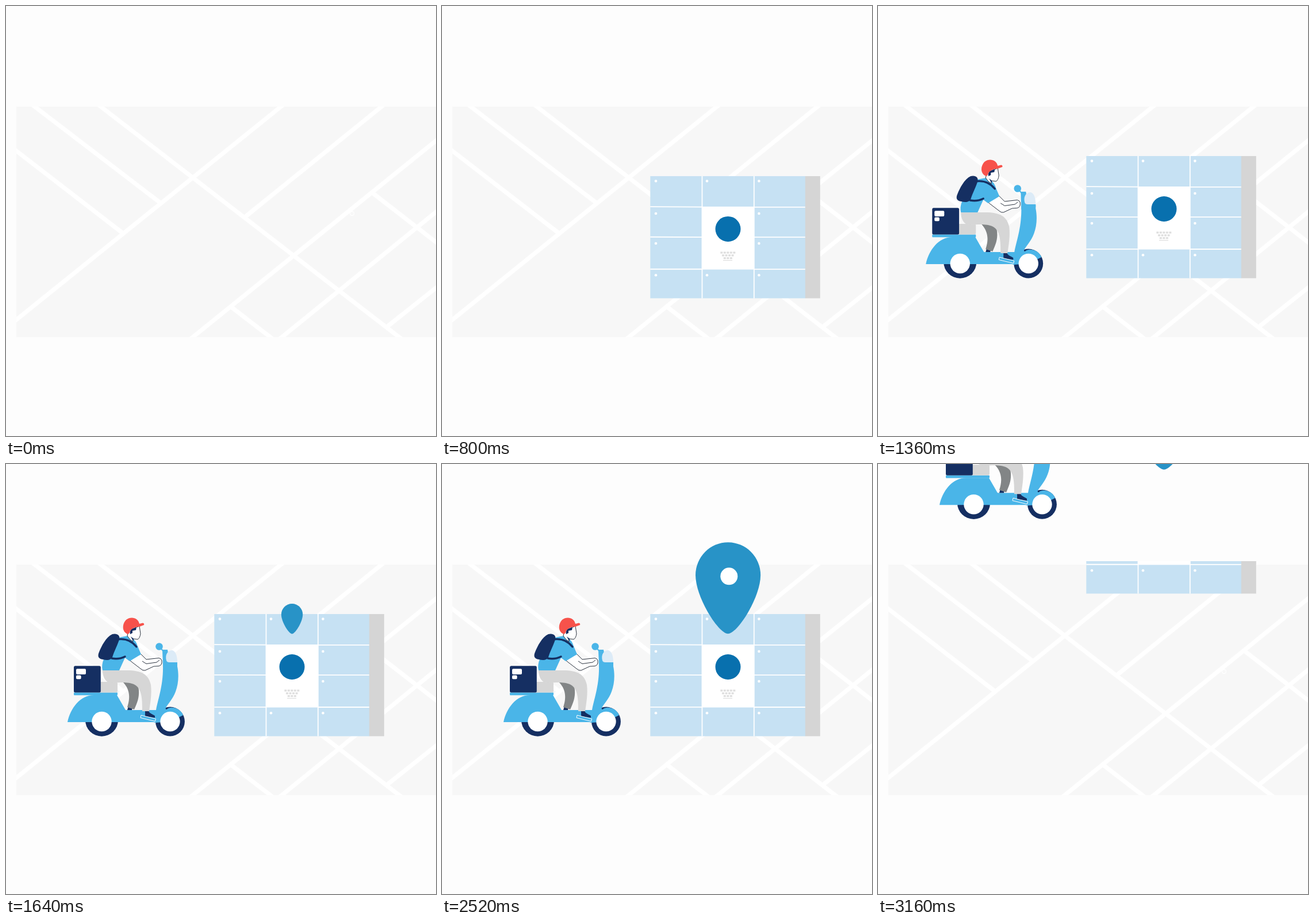
Animation of 748 by 748 pixels, one loop 3.2 s. Source, as an HTML page:

```html
<!DOCTYPE html>
<html lang="en">
<head>
<meta charset="utf-8">
<title>Parcel locker delivery</title>
<style>
  html, body { margin: 0; width: 100%; height: 100%; overflow: hidden; background: #fdfdfd; }
  svg { display: block; width: 100%; height: 100%; }
  .blue { fill: #4ab5e8; }
  .navy { fill: #152f62; }
  .grey { fill: #d6d6d6; }
  .white { fill: #fff; }
  .line { fill: none; stroke: #152f62; stroke-width: 3.4; stroke-linecap: round; }
  .ink { fill: #fff; stroke: #2c3440; stroke-width: 1; stroke-linejoin: round; }
</style>
</head>
<body>
<svg viewBox="0 0 748 748">
  <defs>
    <clipPath id="mapClip"><rect x="18" y="175" width="730" height="401"/></clipPath>
    <clipPath id="lockerClip"><rect x="340" y="169" width="340" height="406"/></clipPath>
  </defs>

  <g clip-path="url(#mapClip)">
    <rect x="18" y="175" width="730" height="401" fill="#f7f7f7"/>
    <path fill="none" stroke="#fff" stroke-width="7.4" d="M46 172L268 342M161 172L689 580M14 249L203 395M14 549L482 172
      M417 366L657 172M320 580L752 231M391 523L465 580M636 324L752 414M475 580L752 355M664 557L752 487"/>
    <circle cx="602" cy="361" r="3.5" fill="none" stroke="#fff" stroke-width="1.3"/>
  </g>

  <g clip-path="url(#lockerClip)">
    <g id="locker">
      <rect x="362.3" y="261" width="270" height="212.5" fill="#c6e1f3"/>
      <rect x="631.8" y="261" width="26" height="212.5" fill="#d5d5d5"/>
      <rect class="white" x="452.3" y="314" width="90.7" height="109.5"/>
      <path fill="none" stroke="#fff" stroke-width="1.8" d="M452.5 261V473.5M542.8 261V473.5
        M362.3 314.2L452 314.6M362.3 366.8L452 367.2M362.3 422.8H452M543 314.9H631.8M543 367.2H631.8M543 423H631.8"/>
      <g id="knobs" class="white"></g>
      <circle cx="497.5" cy="353" r="22" fill="#0870ae"/>
      <g id="keys" fill="#dedede"></g>
      <rect x="489" y="407" width="16" height="1.2" fill="#dedede"/>
    </g>
  </g>

  <g id="scooter">
    <!-- wheels and body -->
    <path class="navy" d="M138 446A28.3 27.5 0 0 0 195 446Z"/>
    <circle class="navy" cx="285.5" cy="448" r="25.4"/>
    <path class="blue" d="M107 449C112 425 129 402 153 402H193L208 428H261C264 410 274 385 273 350L272 324H279
      L298 346V352C301 367 300 383 295 396C290 409 282 417 278 424C277 427 279 428 282 425C293 421 305 428 308 437
      L285.5 448L260 450L257 449Z"/>
    <circle class="white" cx="166.5" cy="448" r="17.2"/>
    <circle class="white" cx="285.5" cy="448" r="17.2"/>
    <path class="blue" d="M273 323H281L285 345H298V350Q297 354 292 354H273Z"/>
    <path fill="#dcebf7" d="M279 342C276 331 282 324 289 324C295 325 298 334 298 345H284Q280 345 279 342Z"/>
    <path d="M267 318L274 326" fill="none" stroke="#4ab5e8" stroke-width="2"/>
    <circle class="blue" cx="266.5" cy="317.5" r="6.3"/>
    <rect class="blue" x="118" y="397.5" width="76" height="4.8" rx="1"/>
    <rect class="grey" x="160" y="379" width="34" height="18.6" rx="3"/>
    <rect class="navy" x="118" y="351.3" width="46.8" height="46.3" rx="2.5"/>
    <rect class="white" x="122" y="356.3" width="17" height="9.6" rx="2"/>
    <rect class="white" x="122" y="367.6" width="8.6" height="6.6" rx="2"/>
    <!-- legs -->
    <path class="navy" d="M213 421L220 424L219 428H211Z"/>
    <path fill="#828586" d="M203 378C219 377 230 380 231 393C232 407 228 416 223 427L211 423C215 411 218 394 203 379Z"/>
    <path class="navy" d="M242 428L248 429C249 434 255 435 259 438L259 441.5L242 439Z"/>
    <path class="grey" d="M168 359H211C236 359 248 366 252 384C254 400 251 416 249 430H237C237 411 237 391 224 384
      C210 377 190 382 179 380C172 378 168 369 168 359Z"/>
    <path d="M235 437L260.5 443.2L259.5 447.6L234 441.5Z" fill="#4ab5e8" stroke="#fff" stroke-width="1"/>
    <!-- rider -->
    <path class="ink" d="M216 341L234 330L244 340L266 337.5Q270 338 271 342V346Q270 351 265 351.5L257 352L242 359Q238 360 234 356L217 343Z"/>
    <path class="ink" fill="none" d="M237 343L244 347.5L262 345L267 341"/>
    <path class="blue" d="M196 302L211 299C222 302 227 309 229 317L235 331L215 343L207 337L197 359H168C165 347 171 334 181 322Z"/>
    <path class="navy" d="M185 296C193 294 199 298 197 305C195 313 188 326 185 336C183 341 176 342 169 340C160 339 159 334 162 327C166 317 174 301 185 296Z"/>
    <path class="line" d="M194 305C209 303 220 309 227 318M184 338C194 340 201 338 207 335"/>
    <path class="ink" d="M211 299L213 290L232 282L234 295Q233 303 229 305L221 304V309Q215 306 211 299Z"/>
    <path class="navy" d="M216 296C214 289 219 286 227 284L226 289L220 290V294Z"/>
    <path class="navy" d="M217 300L222 304L221 308Z"/>
    <path fill="#f7524b" d="M212 296C201 292 202 278 209 271C218 264 230 268 232 278L238 276.5Q241 277 240 280L232 283
      C225 283 219 286 216 290Q215 295 212 296Z"/>
  </g>

  <path id="pin" fill="#2893c7" d="M497.5 295.5C481 295.5 440.8 232 440.8 193A56.8 57.2 0 0 1 554.4 193C554.4 232 514 295.5 497.5 295.5Z"/>
  <circle id="badge" class="white" cx="499.3" cy="195.6" r="15"/>
</svg>

<script>
const LOOP = 3200, STEP = 40;
const el = id => document.getElementById(id);

function add(parent, tag, attrs) {
  const node = document.createElementNS("http://www.w3.org/2000/svg", tag);
  for (const name in attrs) node.setAttribute(name, attrs[name]);
  el(parent).appendChild(node);
}

[269.6, 326, 378, 433.3].forEach((cy, row) => {
  [372, 461, 551.4].forEach((cx, col) => {
    if (col !== 1 || row % 3 === 0) add("knobs", "circle", { cx, cy, r: 2.3 });
  });
});
[5, 4, 3].forEach((count, row) => {
  for (let i = 0; i < count; i++) {
    add("keys", "rect", { x: 495.3 + (i - (count - 1) / 2) * 5.5, y: 392.5 + row * 4.8, width: 4, height: 3.2 });
  }
});

// Distance left to travel, easing out to zero
const arrive = (t, start, span, far) =>
  far * Math.pow(1 - Math.min(1, Math.max(0, (t - start) / span)), 3);

// Accelerating lift that passes through `lift` at 2880 ms
const leave = (t, start, power, lift) =>
  -lift * Math.pow(Math.max(0, t - start) / (2880 - start), power);

const grow = (t, start, rate) =>
  t <= start ? 0 : Math.min(1, 1.018 * (1 - Math.exp(-rate * (t - start))));

function move(id, x, y) {
  el(id).setAttribute("transform", `translate(${x} ${y})`);
}

function pop(id, x, y, size, lift) {
  el(id).setAttribute("transform",
    `translate(${x} ${y + lift}) scale(${size}) translate(${-x} ${-y})`);
}

function draw(t) {
  move("locker", 0, arrive(t, 500, 578, 314) + leave(t, 2609, 2, 60));
  move("scooter", -arrive(t, 946, 714, 320), leave(t, 2622, 2.2, 75));
  pop("pin", 497.5, 295.5, grow(t, 1540, 0.0039), leave(t, 2241, 6, 32.3));
  pop("badge", 499.3, 195.6, grow(t, 1840, 0.0065), leave(t, 2241, 6, 43.5));
}

const began = performance.now();
function tick() {
  const t = (performance.now() - began) % LOOP;
  draw(Math.floor(t / STEP) * STEP);
  requestAnimationFrame(tick);
}
draw(0);
requestAnimationFrame(tick);
</script>
</body>
</html>
```
